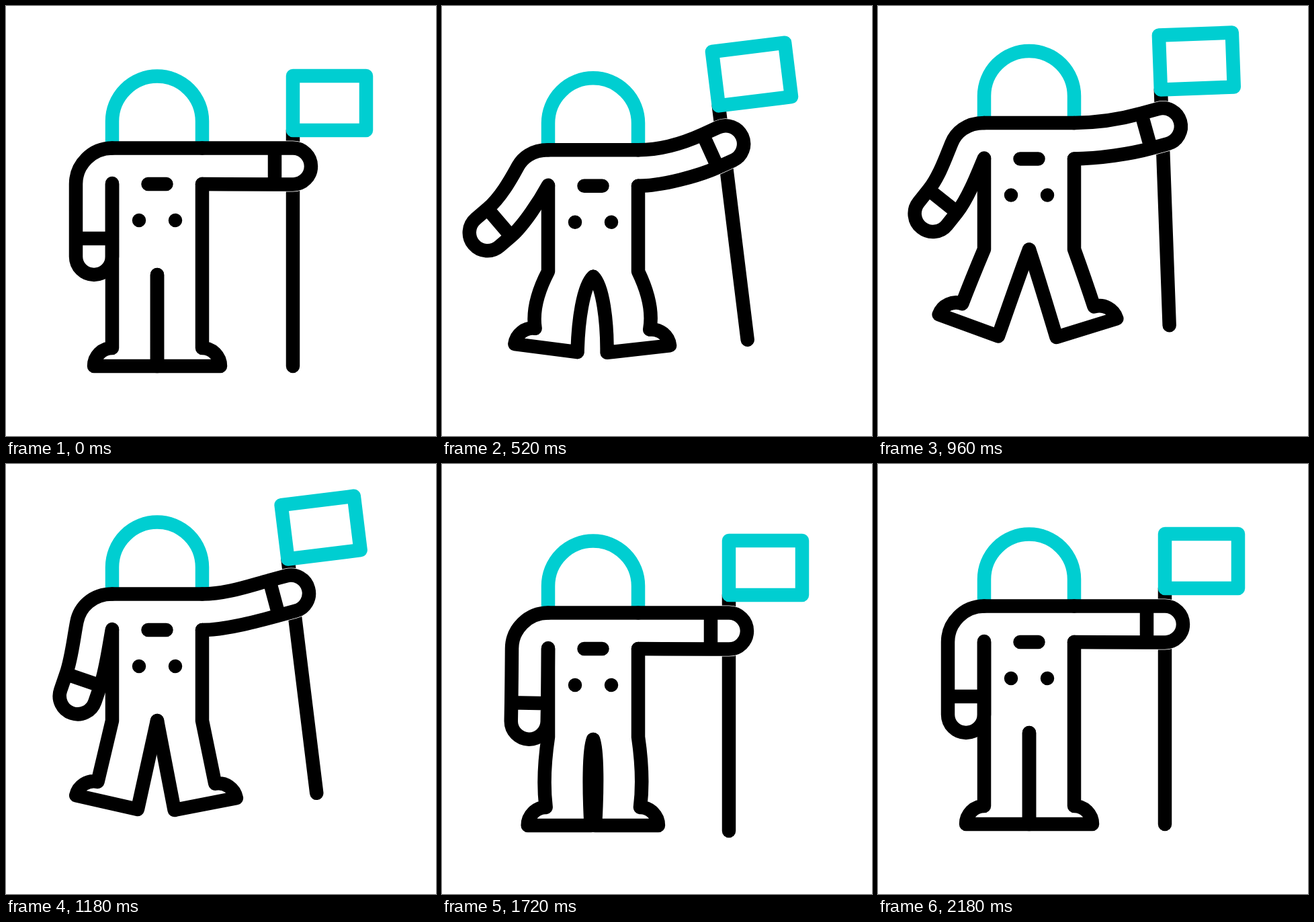
An HTML page that plays this animation: 640 px wide and 640 px high, repeating every 2400 ms.

```html
<!DOCTYPE html>
<html lang="en">
<head>
<meta charset="utf-8">
<title>Astronaut with flag</title>
<style>
  html, body { margin: 0; height: 100%; overflow: hidden; background: #fff; }
  svg { display: block; width: 100%; height: 100%; }
  path { fill: none; stroke: #000; stroke-width: 20.5; stroke-linejoin: round; }
  .round { stroke-linecap: round; }
  .cyan { stroke: #00ced1; }
  .gap { fill: #fff; stroke: #fff; stroke-width: 22; }
</style>
</head>
<body>
<svg viewBox="0 0 640 640">
  <g id="all">
    <path class="cyan" d="M158 211V171.5A67 67 0 0 1 292 171.5V211"/>
    <g id="flag">
      <path class="round" d="M0-53.5V297.5"/>
      <path class="cyan" d="M0-134.5H109V-53.5H0Z"/>
    </g>
    <path id="palm" class="gap"/>
    <path class="round" d="M158 211.5H292M211.5 265H238.5M198 319h.01M252 319h.01"/>
    <path id="leftArm" class="round"/>
    <path id="rightArm" class="round"/>
    <path id="leftLeg" class="round"/>
    <path id="rightLeg" class="round"/>
  </g>
</svg>
<script>
const LOOP = 2400;

// Key poses of the jump, as offsets from standing; whatever is missing is 0.
// drop: body, sole: feet, foot: foot angle, bend: knees, arm: left arm angle,
// reach and lift: right arm angle and hand, tilt and slip: flag
const POSES = [
  { t: 0 },
  { t: 340, drop: 25.5, sole: -2, bend: 11, arm: 41, reach: -28, lift: -44, tilt: -11.7, slip: -3 },
  { t: 660, drop: -24, sole: -41, foot: 16, bend: 3, arm: 52, reach: -20, lift: -26.5, tilt: -2, slip: -4 },
  { t: 800, drop: -46, sole: -55, foot: 23, bend: 1, arm: 50, reach: -16, lift: -18, tilt: 1, slip: -3.5 },
  { t: 1180, drop: -18, sole: -22, foot: 12.8, arm: 19, reach: -15, lift: -28, tilt: -7, slip: 2 },
  { t: 1720, drop: 10, sole: 2, bend: 3.5, arm: 1 },
  { t: 1860, drop: 17, sole: 2, bend: 6 },
  { t: 2180 }
];
const $ = id => document.getElementById(id);
const draw = (id, ...parts) => $(id).setAttribute('d', parts.join(' '));
const val = (i, name) => POSES[i][name] || 0;

// Point (x, y) turned by deg around the origin and moved to o
function turn(o, deg, x, y) {
  const a = deg * Math.PI / 180, c = Math.cos(a), s = Math.sin(a);
  return [o[0] + x * c - y * s, o[1] + x * s + y * c];
}

const rate = (i, name) => (val(i + 1, name) - val(i, name)) / (POSES[i + 1].t - POSES[i].t);

// Speed through a pose: zero at turning points and at both ends
function speed(i, name) {
  if (i === 0 || i === POSES.length - 1) return 0;
  const p = rate(i - 1, name), q = rate(i, name);
  return p * q <= 0 ? 0 : 2 * p * q / (p + q);
}

// Smooth value of one offset at time t
function value(name, t) {
  const i = POSES.findLastIndex(p => p.t <= t);
  if (i === POSES.length - 1) return 0;
  const span = POSES[i + 1].t - POSES[i].t, u = (t - POSES[i].t) / span, v = 1 - u;
  return val(i, name) * v * v * (1 + 2 * u) + val(i + 1, name) * u * u * (3 - 2 * u)
    + span * u * v * (v * speed(i, name) - u * speed(i + 1, name));
}

const cuffGap = deg => 27 - .08 * Math.abs(deg);

function drawLeftArm(deg) {
  const upper = deg * .58, cuff = -cuffGap(deg);
  const hand = [131 - 1.28 * deg, 373 - .35 * deg - .0087 * deg * deg];
  const bend = [104 + .0038 * deg * deg, 265 - .65 * deg + .001 * deg * deg];
  const pit = [158, 264];
  const at = (x, y) => turn(hand, deg, x, y);
  const outer = at(-27, cuff), inner = at(27, cuff);
  draw('leftArm',
    'M158 211.5C', 158 - .55 * (158 - bend[0]), 211.5,
    turn(bend, upper, 0, -.55 * (bend[1] - 211.5)), bend,
    'C', turn(bend, upper, 0, 25), at(-27, cuff - 25), outer,
    'L', at(-27, 0), 'A27 27 0 0 0', at(27, 0), 'L', inner,
    'C', at(27, cuff - 25), turn(pit, upper, 0, 25), pit,
    'M', outer, 'L', inner);
}

function drawRightArm(deg, hand) {
  const cuff = -cuffGap(deg);
  const at = (x, y) => turn(hand, deg, x, y);
  const top = at(cuff, -27), low = at(cuff, 27);
  const palm = ['L', at(0, -27), 'A27 27 0 0 1', at(0, 27), 'L', low];
  draw('palm', 'M', top, ...palm, 'Z');
  draw('rightArm', 'M292 211.5C328 211.5', at(cuff - 30, -27), top, ...palm,
    'C', at(cuff - 30, 27), '328 265 292 265M', top, 'L', low);
}

function drawLeg(id, side, sole, deg, bend) {
  const at = (x, y) => turn(sole, deg, side * x, y);
  const hip = [225 + side * 67, 400 - 1.1 * bend], crotch = [225, 400], ankle = at(67, -27);
  const bow = (a, b, f, k) =>
    [a[0] + (b[0] - a[0]) * f + side * k * bend, a[1] + (b[1] - a[1]) * f];
  draw(id, 'M', hip[0], 265, 'L', hip, 'Q', bow(hip, ankle, .57, 2), ankle,
    'A27 27 0 0', side > 0 ? 1 : 0, at(94, 0), 'L', sole,
    'C', bow(sole, crotch, .4, 1.2), bow(sole, crotch, .88, 1.75), crotch);
}

function frame(now) {
  const get = name => value(name, now % LOOP);
  const drop = get('drop'), reach = get('reach'), slip = get('slip');
  const foot = get('foot'), bend = get('bend');
  const hand = [427 + .2 * reach, 238.5 + get('lift')];
  const ground = 536 + get('sole') - drop, spread = 2.28 * foot + .95 * bend;
  $('all').setAttribute('transform', `translate(0 ${drop})`);
  $('flag').setAttribute('transform',
    `translate(${hand[0] + slip} ${hand[1] + slip}) rotate(${get('tilt')})`);
  drawLeftArm(get('arm'));
  drawRightArm(reach, hand);
  drawLeg('leftLeg', -1, [225 - spread, ground], foot, bend);
  drawLeg('rightLeg', 1, [225 + .88 * spread, ground + .08 * foot], -.86 * foot, bend);
}

const start = performance.now();
function tick() {
  frame(performance.now() - start);
  requestAnimationFrame(tick);
}
tick();
</script>
</body>
</html>
```
